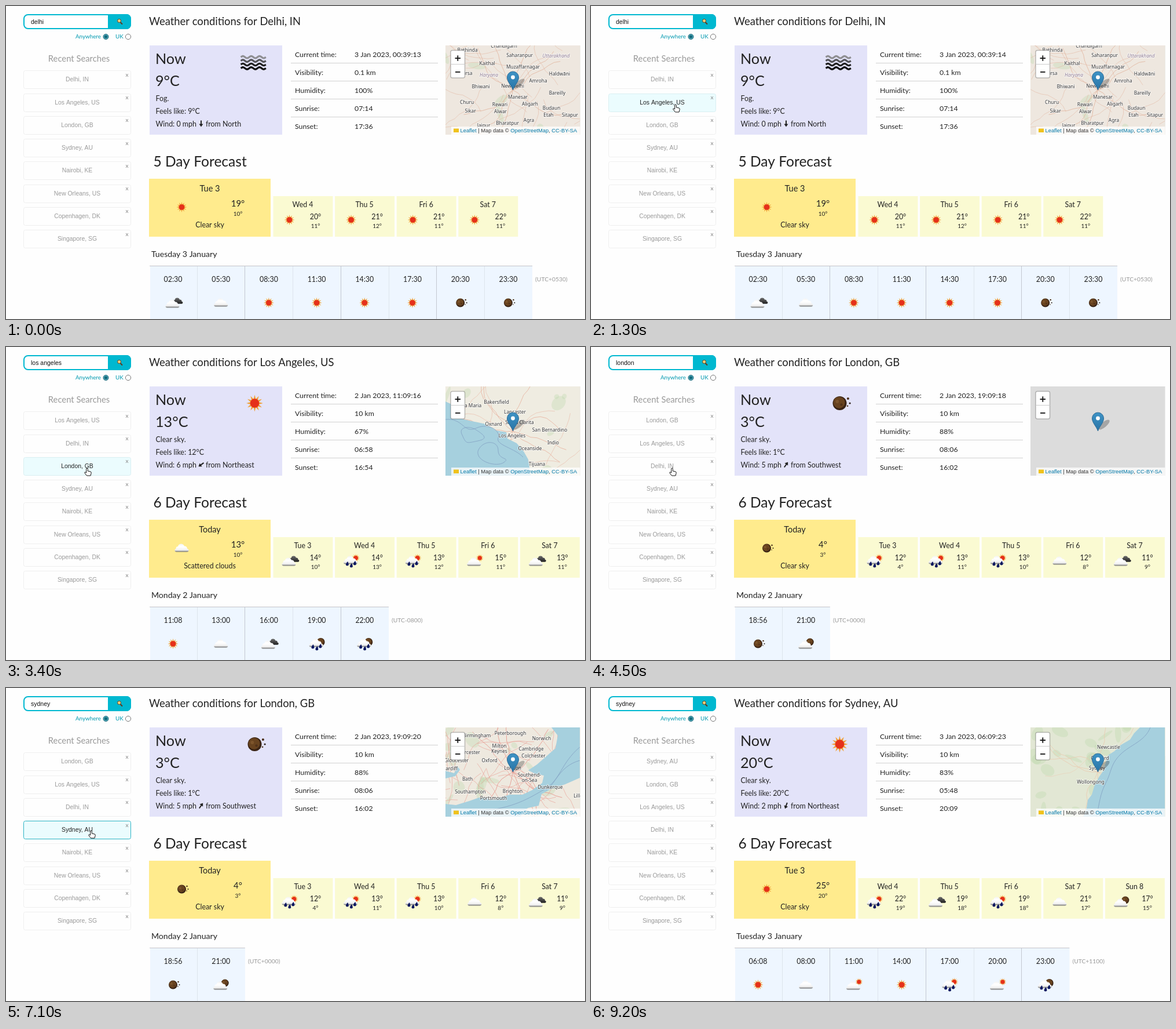
Animation, 1000 px wide and 540 px high, one loop 9.4 s. Source, as an HTML page with a canvas:

```html
<!DOCTYPE html>
<html lang="en">
<head>
<meta charset="utf-8">
<title>Weather conditions</title>
<style>
html, body { margin: 0; width: 1000px; height: 540px; overflow: hidden; background: #fefefe; }
canvas { display: block; }
</style>
</head>
<body>
<canvas id="stage" width="1000" height="540"></canvas>
<script>
const c = document.getElementById('stage').getContext('2d');
const LOOP = 9400, LATO = 'Lato, sans-serif', ARIAL = '"Liberation Sans", Arial, sans-serif';
const INK = '#222', TEAL = '#00b8d0';

// Days: name icon high low. Hours: time icon. Labels: name:x:y.
const cities = [
  { name: 'Delhi, IN', temp: 9, feels: 9, sky: 'Fog', icon: 'fog', wind: '0', from: 'North', turn: 0,
    clock: '3 Jan 2023, 00:39:', facts: ['0.1 km', '100%', '07:14', '17:36'], summary: 'Clear sky', date: 'Tuesday 3 January', utc: '+0530',
    days: 'Tue 3 sun 19 10,Wed 4 sun 20 11,Thu 5 sun 21 12,Fri 6 sun 21 11,Sat 7 sun 22 11',
    hours: '02:30 broken,05:30 cloud,08:30 sun,11:30 sun,14:30 sun,17:30 sun,20:30 moon,23:30 moon',
    land: '#eee7df', road: '#e3b9a4', roads: 34, woods: 5, sea: [],
    labels: 'Chandigarh:860:72,Bathinda:797:79,Saharanpur:887:88,Uttarakhand:950:89,Kaithal:831:102,Muzaffarnagar:893:108,Haryana:834:122,Haldwāni:956:120,Bhiwani:820:142,New Delhi:875:141,Amroha:919:132,Bareilly:952:153,Manesar:884:160,Churu:796:169,Rewari:853:173,Aligarh:905:172,Sikar:802:184,Alwar:854:185,Budaun:942:179,Etah:937:191,Sitapur:974:191,Agra:903:200,Bharatpur:866:205,Jaipur:825:209,Sirsa:796:119' },
  { name: 'Los Angeles, US', temp: 13, feels: 12, sky: 'Clear sky', icon: 'sun', wind: '6', from: 'Northeast', turn: 55,
    clock: '2 Jan 2023, 11:09:', facts: ['10 km', '67%', '06:58', '16:54'], summary: 'Scattered clouds', date: 'Monday 2 January', utc: '-0800',
    days: 'Today cloud 13 10,Tue 3 broken 14 10,Wed 4 rain 14 13,Thu 5 rain 13 12,Fri 6 few 15 11,Sat 7 broken 13 11',
    hours: '11:08 sun,13:00 cloud,16:00 broken,19:00 rainN,22:00 rainN',
    land: '#efece1', road: '#e8b7a4', roads: 18, woods: 12,
    sea: ['M759 94L770 99 775 121 800 127 829 133 846 144 864 147 866 158 882 166 894 180 902 194 906 222H759Z'],
    limits: 'M759 125C790 122 790 150 812 140S855 145 850 157 880 175 893 190M788 152C780 138 800 135 812 143S835 158 815 162 795 168 788 152M815 180C822 160 850 160 850 178S872 190 860 199 812 198 815 180',
    labels: 'Bakersfield:847:98,Lancaster:879:115,Santa Maria:798:104,Oxnard:842:136,Santa Clarita:887:133,San Bernardino:939:146,Los Angeles:874:156,Indio:945:168,Oceanside:905:178,Tijuana:917:205' },
  { name: 'London, GB', temp: 3, feels: 1, sky: 'Clear sky', icon: 'moon', wind: '5', from: 'Southwest', turn: 215,
    clock: '2 Jan 2023, 19:09:', facts: ['10 km', '88%', '08:06', '16:02'], summary: 'Clear sky', date: 'Monday 2 January', utc: '+0000',
    days: 'Today moon 4 3,Tue 3 rain 12 4,Wed 4 rain 13 11,Thu 5 rain 13 10,Fri 6 cloud 12 8,Sat 7 broken 11 9',
    hours: '18:56 moon,21:00 fewN',
    land: '#eee9df', road: '#e79a90', roads: 48, woods: 18,
    sea: ['M942 68L953 82 949 104 933 118 917 132 902 142 914 148 929 151 926 164 909 176 892 184 870 184 844 192 817 189 800 195 777 202 759 200V222H888L901 207 920 203 925 183 942 174 966 166 991 155V68Z',
      'M759 143L774 147 780 135 784 141 776 152 759 156Z'],
    limits: 'M991 102C958 130 958 158 931 174S875 208 820 212M991 125C955 135 950 165 933 176',
    labels: 'Birmingham:813:85,Peterborough:871:81,Norwich:925:90,Milton:852:103,Keynes:852:112,Cambridge:907:108,Colchester:911:120,Worcester:799:114,Gloucester:778:128,Oxford:835:128,Cardiff:767:142,London:875:141,Southend-:904:153,on-Sea:904:162,Bath:797:160,Southampton:802:182,Brighton:875:181,Portsmouth:842:193,Dunkerque:940:174,Lille:988:189' },
  { name: 'Sydney, AU', temp: 20, feels: 20, sky: 'Clear sky', icon: 'sun', wind: '2', from: 'Northeast', turn: 20,
    clock: '3 Jan 2023, 06:09:', facts: ['10 km', '83%', '05:48', '20:09'], summary: 'Clear sky', date: 'Tuesday 3 January', utc: '+1100',
    days: 'Tue 3 sun 25 20,Wed 4 rain 22 19,Thu 5 broken 19 18,Fri 6 rain 19 18,Sat 7 cloud 21 17,Sun 8 fewN 17 15',
    hours: '06:08 sun,08:00 cloud,11:00 few,14:00 sun,17:00 rain,20:00 few,23:00 rainN',
    land: '#e2e7d4', road: '#e9cdb4', roads: 10, woods: 30,
    sea: ['M948 68L938 78 931 89 914 99 904 109 893 116 889 129 884 144 877 154 869 170 865 184 858 193 856 207 850 222H991V68Z'],
    limits: 'M966 68C957 92 931 98 914 115S899 145 889 164 878 200 873 222',
    labels: 'Newcastle:894:105,Gosford:879:124,Sydney:874:141,Wollongong:863:165' }
];
const others = ['Nairobi, KE', 'New Orleans, US', 'Copenhagen, DK', 'Singapore, SG'];

// One entry per city, in the order they are visited.
const typed = [0, 1500, 3800, 6900], focused = [0, 1700, 4100, 7100];
const loads = [0, 1900, 4300, 7300], tiles = [-300, 1900, 4500, 7500];
const moves = [0, 300, 3000, 5300, 7400];
const recents = [[0, 1, 2, 3], [1, 0, 2, 3], [2, 1, 0, 3], [3, 2, 1, 0]];
const ticks = [700, 1700, 2800, 3600, 4300, 5400, 6500, 7300, 8300, 9200];
const path = [[300, 420, 560], [1300, 146, 170], [3000, 146, 170], [3400, 140, 209],
  [5300, 140, 209], [5800, 147, 246], [7400, 147, 246], [8200, 420, 560]];
const HAND = new Path2D('M-1.3 8V1.2Q-1.3 0 0 0T1.3 1.2V5L6 6Q7.5 6.5 7.2 8.5L6 13H-.5L-4 8.5Q-4.8 7-3.3 6.8Z');
const ARROW = new Path2D('M0 0V12L2.8 9.5 4.6 13.5 6.4 12.7 4.7 8.8H8.4Z');
const PIN = new Path2D('M875.5 145C873 137 865.5 131 865.5 123A10 10 0 0 1 885.5 123C885.5 131 878 137 875.5 145Z');

const last = (times, t) => times.filter(v => v <= t).length - 1;

function text(s, x, y, size, color = INK, align = 'left', font = LATO) {
  c.font = size + 'px ' + font;
  c.textAlign = align;
  c.fillStyle = color;
  c.fillText(s, x, y);
  return c.measureText(s).width;
}
function rect(x, y, w, h, color) {
  c.fillStyle = color;
  c.fillRect(x, y, w, h);
}
function box(x, y, w, h, r, fill, stroke, width = 1) {
  c.beginPath();
  c.roundRect(x, y, w, h, r);
  if (fill) { c.fillStyle = fill; c.fill(); }
  if (stroke) { c.strokeStyle = stroke; c.lineWidth = width; c.stroke(); }
}
function disc(x, y, r, fill, stroke) {
  c.beginPath();
  c.arc(x, y, r, 0, 7);
  if (fill) { c.fillStyle = fill; c.fill(); }
  if (stroke) { c.strokeStyle = stroke; c.lineWidth = 1; c.stroke(); }
}
function fade(y0, y1, ...colors) {
  const g = c.createLinearGradient(0, y0, 0, y1);
  colors.forEach((v, i) => g.addColorStop(i / (colors.length - 1), v));
  return g;
}

// Weather icons, drawn around (0, 0)
function sun(x = 0, y = 0, r = 9) {
  c.beginPath();
  for (let i = 0; i < 24; i++) {
    const a = i * Math.PI / 12, d = i % 2 ? r * .52 : r;
    c.lineTo(x + d * Math.sin(a), y - d * Math.cos(a));
  }
  c.closePath();
  c.fillStyle = '#f0a03a';
  c.fill();
  disc(x, y, r * .54, '#e5301a');
}
function moon(x = 0, y = 0, r = 7.5) {
  disc(x, y, r, '#3a2415');
  disc(x - r * .08, y - r * .1, r * .82, '#68431f');
  disc(x - r * .35, y - r * .25, r * .25, '#7d552c');
  disc(x + r * .25, y + r * .2, r * .18, '#50311a');
}
function cloud(x, y, k, ...colors) {
  c.save();
  c.translate(x, y);
  c.scale(k, k);
  c.fillStyle = fade(-7, 7, ...colors);
  c.beginPath();
  for (const [cx, cy, r] of [[-6, 1, 4], [-1, -2, 5.5], [5, 1, 4.5]]) {
    c.moveTo(cx + r, cy);
    c.arc(cx, cy, r, 0, 7);
  }
  c.roundRect(-12, 1, 24, 5.5, 2.7);
  c.fill();
  c.restore();
}
const white = (x = 0, y = 0) => cloud(x, y, 1, '#f4f4f4', '#fff', '#fbfbfb', '#ededed', '#555');
function rain() {
  white(-1, -1);
  c.fillStyle = '#0c1860';
  for (const [x, y] of [[-7, 6], [0, 9], [6, 5]]) {
    c.beginPath();
    c.moveTo(x + 1, y - 5);
    c.quadraticCurveTo(x + 5, y + 2.5, x, y + 2.5);
    c.quadraticCurveTo(x - 5, y + 1.5, x + 1, y - 5);
    c.fill();
  }
}
const icons = {
  sun() { sun(); },
  moon() {
    moon();
    disc(9, -5, 1.3, '#4a2f1b');
    disc(11, 0, 1, '#2c211a');
    disc(8.5, 3, .8, '#4a2f1b');
  },
  cloud() { white(0, 0); },
  broken() { cloud(8, -3, .74, '#686868', '#444', '#1c1c1c'); white(-1, 2); },
  few() { sun(9, -5, 6.5); white(-1, 2); },
  fewN() { moon(7, -3, 6.5); white(-1, 2); },
  rain() { sun(8, -5, 7); rain(); },
  rainN() { moon(7, -3, 7); rain(); },
  fog() {
    c.lineWidth = 2;
    ['#8f8f93', '#555559', '#222', '#111'].forEach((color, i) => {
      const y = -5.5 + i * 4;
      c.strokeStyle = color;
      c.beginPath();
      c.moveTo(-14, y);
      for (let x = -14; x <= 13; x += .5) c.lineTo(x, y - 1.1 * Math.sin((x + 14) * .7));
      c.stroke();
    });
  }
};
function icon(kind, x, y, k = 1) {
  c.save();
  c.translate(x, y);
  c.scale(k, k);
  icons[kind]();
  c.restore();
}

function terrain(city, seed) {
  let s = seed * 977 + 41;
  const rnd = () => (s = (s * 16807) % 2147483647) / 2147483647;
  for (let i = 0; i < 10; i++) rnd();
  rect(759, 68, 233, 154, city.land);
  for (let i = 0; i < city.woods; i++) {
    c.fillStyle = 'rgba(183,212,165,.3)';
    c.beginPath();
    c.ellipse(759 + rnd() * 232, 68 + rnd() * 154, 4 + rnd() * 14, 3 + rnd() * 8, rnd() * 3, 0, 7);
    c.fill();
  }
  c.strokeStyle = city.road;
  for (let i = 0; i < city.roads; i++) {
    const hub = i < 9;
    let x = hub ? 875 : 759 + rnd() * 232, y = hub ? 145 : 68 + rnd() * 154;
    let a = hub ? i * .7 : rnd() * 6.3;
    c.lineWidth = hub ? .9 : .6;
    c.beginPath();
    c.moveTo(x, y);
    for (let j = 0; j < 9; j++) {
      a += rnd() * .8 - .4;
      c.lineTo(x += 11 * Math.cos(a), y += 11 * Math.sin(a));
    }
    c.stroke();
  }
  for (const d of city.sea) {
    c.fillStyle = '#a6d0de';
    c.fill(new Path2D(d));
  }
  if (city.limits) {
    c.strokeStyle = '#86a5c6';
    c.lineWidth = .9;
    c.stroke(new Path2D(city.limits));
  }
  c.lineJoin = 'round';
  for (const label of city.labels.split(',')) {
    const [name, x, y] = label.split(':');
    const region = /Uttar|Haryana/.test(name);
    c.font = (region ? 'italic ' : '') + '8.3px "Noto Sans", sans-serif';
    c.textAlign = 'center';
    c.strokeStyle = 'rgba(255,255,255,.7)';
    c.lineWidth = 1.8;
    c.strokeText(name, x, y);
    c.fillStyle = region ? '#8d7a91' : '#333';
    c.fillText(name, x, y);
  }
}

function map(city, n, t) {
  c.save();
  c.beginPath();
  c.rect(759, 68, 232.5, 154);
  c.clip();
  rect(759, 68, 233, 154, '#dcdcdc');
  c.globalAlpha = Math.min(1, Math.max(0, (t - tiles[n]) / 300));
  if (c.globalAlpha) terrain(city, n + 1);
  c.globalAlpha = 1;

  c.fillStyle = 'rgba(0,0,0,.25)';
  c.beginPath();
  c.ellipse(886, 134, 12, 4.5, -.7, 0, 7);
  c.fill();
  c.fillStyle = fade(113, 145, '#3f93c5', '#2874a6');
  c.fill(PIN);
  c.strokeStyle = '#2e6c97';
  c.lineWidth = 1;
  c.stroke(PIN);
  disc(875.5, 123, 3.4, '#fff');

  box(768, 76.5, 24.5, 47.5, 3, '#fff', 'rgba(0,0,0,.25)', 1.5);
  rect(768, 100, 24.5, 1, '#ccc');
  rect(775.5, 89.2, 9.5, 1.8, '#111');
  rect(779.4, 85.3, 1.8, 9.5, '#111');
  rect(776, 113, 8.5, 1.8, '#111');

  rect(769, 208, 223, 14, 'rgba(255,255,255,.75)');
  rect(773, 211.5, 9, 6.5, '#f0c21c');
  let x = 784.5;
  for (const [s, color] of [['Leaflet', '#0078a8'], [' | Map data © ', '#333'], ['OpenStreetMap', '#0078a8'], [', ', '#333'], ['CC-BY-SA', '#0078a8']])
    x += text(s, x, 218, 9.36, color, 'left', ARIAL);
  c.restore();
}

function search(t) {
  box(31, 15, 184, 24, 7, '#fff', TEAL, 2);
  box(176, 14, 40, 26, [0, 8, 8, 0], TEAL);
  const word = cities[last(typed, t)].name.split(',')[0].toLowerCase();
  text(word, 43, 31, 10.5, '#111', 'left', ARIAL);
  c.strokeStyle = '#5b3a22';
  c.lineWidth = 2;
  c.beginPath();
  c.moveTo(197.5, 28);
  c.lineTo(201, 31.5);
  c.stroke();
  disc(195.5, 25.5, 3, '#f1cf76', '#5b3a22');
  text('Anywhere', 120, 56, 9.8, '#0099b0');
  text('UK', 189, 56, 9.8, '#0099b0');
  disc(172.5, 53, 4.5, '#5cb4c3', '#155f70');
  disc(172.5, 53, 2.8, '#11687b');
  disc(211, 53, 4.6, '#fff', '#777');
}

function sidebar(n, t, pos) {
  search(t);
  text('Recent Searches', 126, 96, 14.8, '#999', 'center');
  const awake = t >= loads[n] && moves[n + 1] <= t;
  const names = recents[n].map(i => cities[i].name).concat(others);
  let hovering = false;
  names.forEach((name, i) => {
    const y = 126.8 + 39.27 * i;
    const over = pos && awake && Math.abs(pos[1] - y) < 15.7 && pos[0] > 30 && pos[0] < 216;
    const focus = over && n < 3 && t >= focused[n + 1];
    box(30.5, Math.round(y - 15.5) + .5, 185, 31, 3, over ? '#ebfcfe' : null, focus ? '#2cb3c4' : over ? '#d9eff2' : '#efefef');
    text(name, 123, y + 3.6, 10.4, over ? '#222' : '#9a9a9a', 'center', ARIAL);
    text('x', 209, y - 5, 10, '#888', 'center');
    hovering = hovering || over;
  });
  return hovering;
}

function now(city) {
  rect(248, 68, 229, 154, '#e3e3f9');
  text('Now', 258, 100, 25.2);
  text(city.temp + '°C', 258, 138, 25.2);
  icon(city.icon, city.icon === 'fog' ? 428 : 429.5, 97, 1.6);
  text(city.sky + '.', 258.5, 163.5, 12.4);
  text(`Feels like: ${city.feels}°C`, 258.5, 186, 12.4);
  const x = 258.5 + text(`Wind: ${city.wind} mph `, 258.5, 208, 12.4);
  c.save();
  c.translate(x + 5, 203);
  c.rotate(city.turn * Math.PI / 180);
  rect(-1, -5.5, 2, 7, '#222');
  c.beginPath();
  c.moveTo(-3.5, .5);
  c.lineTo(3.5, .5);
  c.lineTo(0, 5.5);
  c.fill();
  c.restore();
  text('from ' + city.from, x + 13, 208, 12.4);
}

function forecast(city) {
  const days = city.days.split(',');
  text(days.length + ' Day Forecast', 254.5, 277, 24.55);
  days.forEach((day, i) => {
    const [, name, kind, high, low] = day.match(/^(.+) (\w+) (\d+) (\d+)$/);
    if (!i) {
      rect(247, 298, 210, 100, '#ffeb8d');
      text(name, 352, 320, 14.5, INK, 'center');
      icon(kind, 303.5, 347);
      text(high + '°', 400.5, 346, 14.9, INK, 'center');
      text(low + '°', 400.5, 362, 10, INK, 'center');
      text(city.summary, 352, 382, 12.4, INK, 'center');
      return;
    }
    const x = 461.5 + 106.6 * (i - 1);
    rect(x, 328, 103, 70, '#fafad2');
    text(name, x + 51, 347, 12.4, INK, 'center');
    icon(kind, x + 28, 369);
    text(high + '°', x + 73, 368, 12.4, INK, 'center');
    text(low + '°', x + 73, 383, 10, INK, 'center');
  });
}

function hourly(city) {
  const hours = city.hours.split(','), step = 82.7, end = 247.5 + hours.length * step;
  text(city.date, 251, 433, 14.1);
  rect(249, 449, end - 249, 91, '#eef6ff');
  rect(248, 448, end - 248, 1, '#c4c4c8');
  hours.forEach((hour, i) => {
    const [time, kind] = hour.split(' '), x = 247.5 + step * i;
    if (i) rect(Math.round(x - .5), 449, 1, 91, i % 2 ? '#dde4ec' : '#c3c8d0');
    text(time, x + 41, 476, 12.4, INK, 'center');
    icon(kind, x + 41, 512);
  });
  text(`(UTC${city.utc})`, end + 5, 475, 10.3, '#999');
}

function cursorAt(t) {
  if (t < 400 || t >= 8200) return null;
  const i = last(path.map(p => p[0]), t);
  const [t0, x0, y0] = path[i], [t1, x1, y1] = path[i + 1];
  const u = (t - t0) / (t1 - t0), e = u * u * (3 - 2 * u);
  return [x0 + (x1 - x0) * e, y0 + (y1 - y0) * e];
}
function pointer([x, y], hand) {
  c.save();
  c.translate(x, y);
  c.lineWidth = 1;
  c.fillStyle = hand ? '#fff' : '#111';
  c.strokeStyle = hand ? '#111' : '#fff';
  const shape = hand ? HAND : ARROW;
  c.fill(shape);
  c.stroke(shape);
  c.restore();
}

function draw(ms) {
  const t = Math.floor(ms % LOOP / 100) * 100;
  const n = last(loads, t), city = cities[n], pos = cursorAt(t);
  rect(0, 0, 1000, 540, '#fefefe');
  const over = sidebar(n, t, pos);
  text('Weather conditions for ' + city.name, 247, 33, 18.4);
  now(city);
  const values = [city.clock + (14 + last(ticks, t)), ...city.facts];
  ['Current time:', 'Visibility:', 'Humidity:', 'Sunrise:', 'Sunset:'].forEach((label, i) => {
    const y = 88 + 31 * i;
    text(label, 499, y, 12.3);
    text(values[i], 602, y, 12.3);
    if (i < 4) rect(492, y + 10, 254, 1, '#d0d0d0');
  });
  map(city, n, t);
  forecast(city);
  hourly(city);
  if (pos) pointer(pos, over || (pos[0] < 216 && pos[1] < 418));
}

const start = performance.now();
(function frame() {
  draw(performance.now() - start);
  requestAnimationFrame(frame);
})();
</script>
</body>
</html>
```
